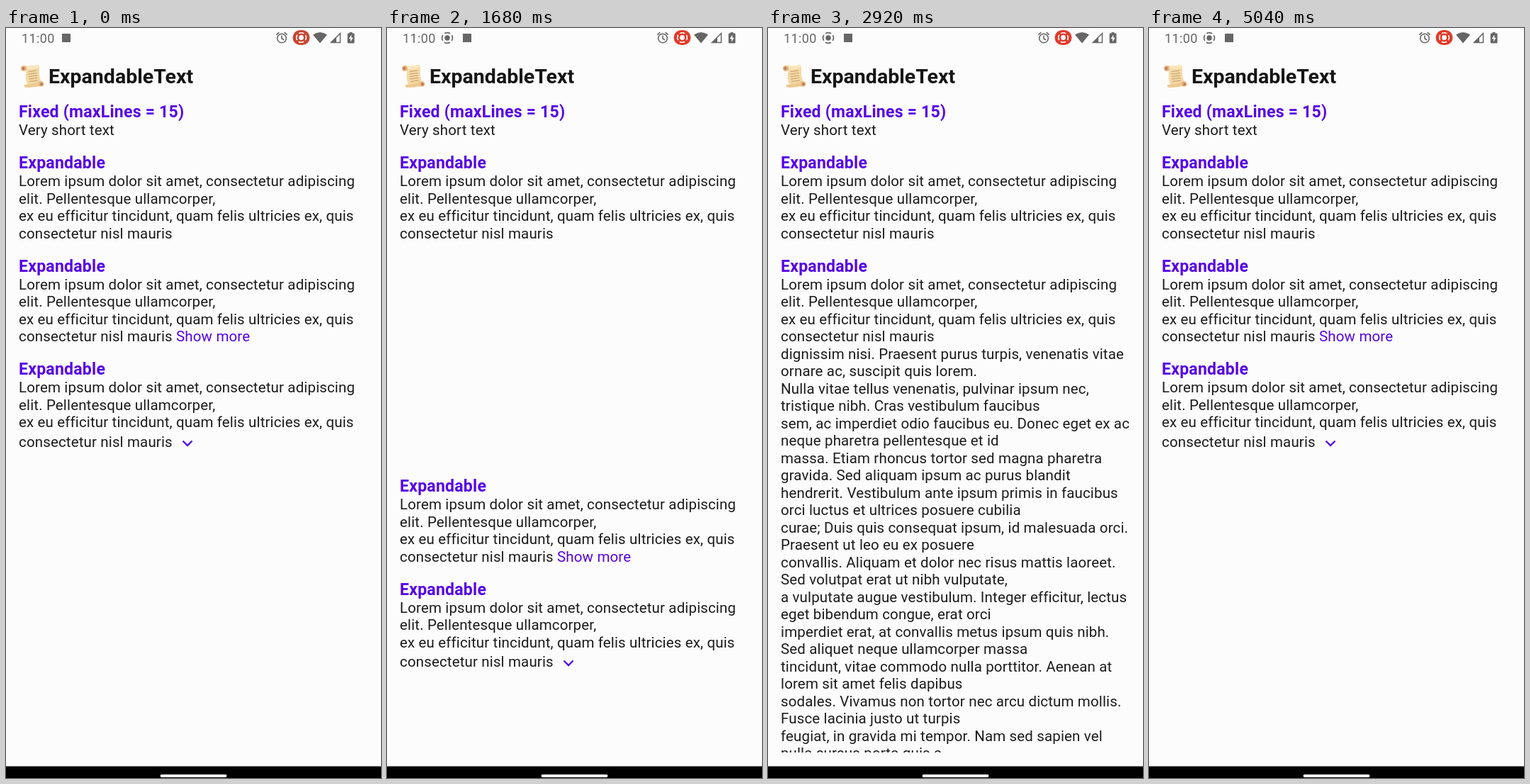
An HTML page for the animation above (5.08 s loop, 529x1058 px).

```html
<!DOCTYPE html>
<html lang="en">
<head>
<meta charset="utf-8">
<title>ExpandableText</title>
<style>
html, body { margin: 0; width: 100%; height: 100%; overflow: hidden; background: #fcfcfc; }
#stage { position: relative; width: 529px; height: 1058px; overflow: hidden; background: #fcfcfc; font-family: Roboto, sans-serif; color: #1c1c1c; }
#bars { position: absolute; left: 0; top: 0; }
#column { position: absolute; left: 18px; top: 105.4px; width: 511px; height: 916.4px; overflow: hidden; }
h2 { margin: 0; font: 600 23.1px/27px Roboto, sans-serif; letter-spacing: .2px; color: #5604e6; white-space: pre; }
.body { margin-bottom: 20.55px; overflow: hidden; font-size: 20.5px; line-height: 24.49px; letter-spacing: .145px; white-space: pre; }
.more { color: #5604e6; }
.low { position: relative; top: 3px; }
.low svg { position: absolute; left: 229px; top: 8px; }
</style>
</head>
<body>
<div id="stage">
  <div id="column">
    <h2>Fixed (maxLines = 15)</h2>
    <div class="body">Very short text</div>
  </div>
  <svg id="bars" width="529" height="1058" viewBox="0 0 529 1058" fill="#666">
    <text x="22" y="20.5" font-family="Roboto, sans-serif" font-size="18" letter-spacing=".4">11:00</text>
    <g id="cast" fill="none" stroke="#666" stroke-width="1.7">
      <circle cx="85" cy="14" r="3.7" fill="#666" stroke="none"/>
      <circle cx="85" cy="14" r="7.4" stroke-dasharray="8.4 3.224" stroke-dashoffset="4.2"/>
    </g>
    <rect id="app" x="107" y="8" width="12" height="12"/>
    <g fill="none" stroke="#666" stroke-width="1.6">
      <circle cx="389" cy="14.5" r="6.3"/>
      <path d="M389 10.5v4.5l3 1.8M381.3 9.6l4-3.4M396.7 9.6l-4-3.4"/>
    </g>
    <rect id="chip" x="404.5" y="3" width="24" height="21" rx="10.5"/>
    <g fill="none" stroke="#fff" stroke-width="1.6">
      <circle cx="416.5" cy="13.5" r="3.4" fill="#fff" stroke="none"/>
      <circle cx="416.5" cy="13.5" r="6.8" stroke-dasharray="7.6 3.08" stroke-dashoffset="3.8"/>
    </g>
    <path d="M433 9.6Q443 2.4 453 9.6L443 21.5Z"/>
    <path d="M471.5 7.5V20.5H458.5Z" fill="none" stroke="#666" stroke-width="1.5"/>
    <path d="M466 13V20.5H458.5Z"/>
    <path d="M484.5 7.5V6H488.5V7.5H490.5Q491.5 7.5 491.5 8.5V20.5Q491.5 21.5 490.5 21.5H482.7Q481.7 21.5 481.7 20.5V8.5Q481.7 7.5 482.7 7.5Z"/>
    <path d="M487.3 9.5L483.5 15.3H486V19.5L489.7 13.7H487.3Z" fill="#fff"/>

    <path d="M25 53Q35 54.5 44 52Q48 52 47 58Q46 68 50 77L31 82Q26 72 28.5 60Z" fill="#f4d9a5"/>
    <path d="M25 53Q35 54.5 44 52Q47.5 52 47 56Q37 59 27 58Z" fill="#fae6bd"/>
    <circle cx="25" cy="57" r="4" fill="#e5b780"/>
    <circle cx="24.5" cy="57" r="2" fill="#bd765e"/>
    <path d="M26 80Q37 80 49 75Q54 76 53 81Q40 84 29 84Q25 84 26 80Z" fill="#edc98f"/>
    <circle cx="49.5" cy="79" r="3.8" fill="#e5b780"/>
    <circle cx="50" cy="79.2" r="1.9" fill="#bd765e"/>
    <path d="M32 61.5L43 60M31.5 65L43.5 63.5M32 68.5L44 67M32 72L44.5 70.5M33 75.5L45 74" fill="none" stroke="#c39a68"/>
    <text x="60" y="78" font-family="Roboto, sans-serif" font-size="28.5" font-weight="600" fill="#151515">ExpandableText</text>

    <rect y="1041.5" width="529" height="16.5" fill="#000"/>
    <rect x="217.5" y="1053" width="94" height="4" rx="2" fill="#f4f4f4"/>
  </svg>
</div>
<script>
const LOOP = 5080, STEP = 40, LINE = 24.49;

const intro = `Lorem ipsum dolor sit amet, consectetur adipiscing
elit. Pellentesque ullamcorper,
ex eu efficitur tincidunt, quam felis ultricies ex, quis
`;
const tail = 'consectetur nisl mauris';
const rest = `
dignissim nisi. Praesent purus turpis, venenatis vitae
ornare ac, suscipit quis lorem.
Nulla vitae tellus venenatis, pulvinar ipsum nec,
tristique nibh. Cras vestibulum faucibus
sem, ac imperdiet odio faucibus eu. Donec eget ex ac
neque pharetra pellentesque et id
massa. Etiam rhoncus tortor sed magna pharetra
gravida. Sed aliquam ipsum ac purus blandit
hendrerit. Vestibulum ante ipsum primis in faucibus
orci luctus et ultrices posuere cubilia
curae; Duis quis consequat ipsum, id malesuada orci.
Praesent ut leo eu ex posuere
convallis. Aliquam et dolor nec risus mattis laoreet.
Sed volutpat erat ut nibh vulputate,
a vulputate augue vestibulum. Integer efficitur, lectus
eget bibendum congue, erat orci
imperdiet erat, at convallis metus ipsum quis nibh.
Sed aliquet neque ullamcorper massa
tincidunt, vitae commodo nulla porttitor. Aenean at
lorem sit amet felis dapibus
sodales. Vivamus non tortor nec arcu dictum mollis.
Fusce lacinia justo ut turpis
feugiat, in gravida mi tempor. Nam sed sapien vel
nulla cursus porta quis a
libero. Morbi luctus enim id mauris blandit, vitae
rhoncus magna tempus. Ut eget
dui vel ante lobortis semper. Quisque sit amet nisl
pretium, varius elit non.`;

const chevron = '<svg width="18" height="12" fill="none" stroke="#5604e6" stroke-width="2.4"><path d="M2.5 2.5L9 9L15.5 2.5"/></svg>';

// open/close are tap times; small/full are the body heights
const blocks = [
  { open: 933.4, close: 1584.6, small: 4 * LINE, full: 817.6, end: tail },
  { open: 2375.7, close: 3045, small: 4 * LINE, full: 672.1, end: tail + ' <span class="more">Show more</span>' },
  { open: 3750, close: 4415, small: 4 * LINE + 6, full: 526.6, end: `<span class="low">${tail}${chevron}</span>` },
];

const column = document.getElementById('column');
const cast = document.getElementById('cast');
const app = document.getElementById('app');
const chip = document.getElementById('chip');

for (const b of blocks) {
  column.insertAdjacentHTML('beforeend',
    `<h2>Expandable</h2><div class="body"><div>${intro}${b.end}</div><div>${intro}${tail}${rest}</div></div>`);
  b.body = column.lastElementChild;
  [b.short, b.long] = b.body.children;
}

const clamp = x => Math.max(0, Math.min(1, x));

// Critically damped spring, stiffness 400
function spring(ms) {
  const x = Math.max(0, ms) * 0.02;
  return 1 - (1 + x) * Math.exp(-x);
}

function draw(t) {
  for (const b of blocks) {
    const opened = t >= b.open && t < b.close;
    const amount = t < b.close ? spring(t - b.open) : 1 - spring(t - b.close);
    b.short.style.display = opened ? 'none' : '';
    b.long.style.display = opened ? '' : 'none';
    b.body.style.height = b.small + (b.full - b.small) * amount + 'px';
  }
  const p = clamp((t - 40) / 240);
  const slide = p * p * (3 - 2 * p);
  cast.setAttribute('opacity', slide);
  app.setAttribute('x', 79 + 28 * slide);
  chip.setAttribute('fill', `rgb(${200 + 26 * p}, ${70 - 12 * p}, ${50 - 8 * p})`);
}

const start = performance.now();
function tick() {
  const t = (performance.now() - start) % LOOP;
  draw(Math.floor(t / STEP) * STEP);
  requestAnimationFrame(tick);
}
draw(0);
requestAnimationFrame(tick);
</script>
</body>
</html>
```
